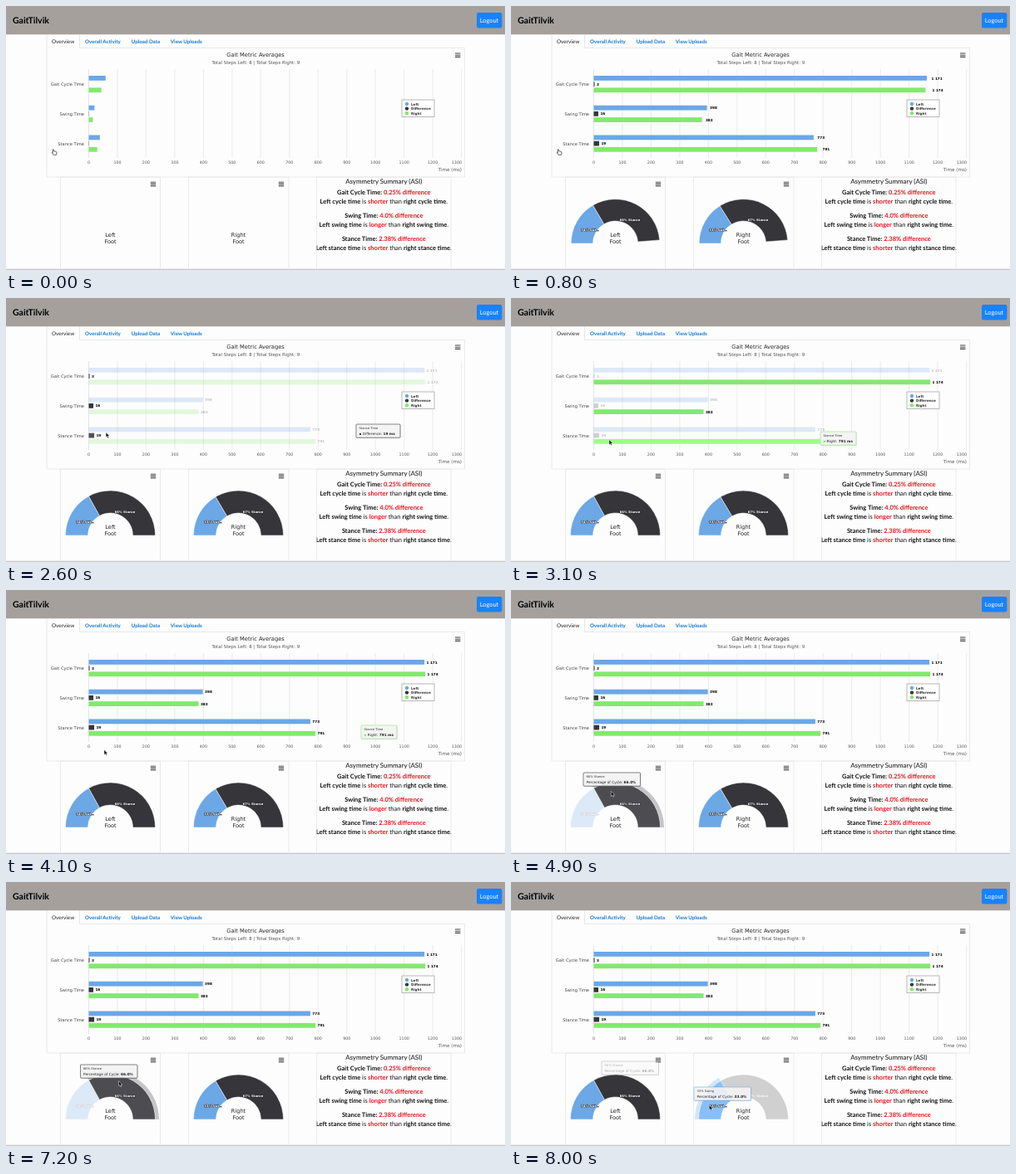
An HTML page for the animation above (8100 ms loop, 600x318 px).

```html
<!DOCTYPE html>
<html lang="en">
<head>
<meta charset="utf-8">
<title>Gait dashboard</title>
<style>
  html, body { margin: 0; width: 100%; height: 100%; overflow: hidden; background: #fdfdfd; }
  svg { display: block; width: 100%; height: 100%; text-rendering: geometricPrecision; }
  text { white-space: pre; }
  .page { font-family: Lato, sans-serif; }
  .chart { font-family: "DejaVu Sans", sans-serif; }
  .mid { text-anchor: middle; }
  .end { text-anchor: end; }
  .bold { font-weight: 700; }
  .warn { font-weight: 700; fill: #e3121b; }
  .slice-label { font-weight: 700; text-anchor: middle; fill: #fff; stroke: #222; stroke-width: .7; paint-order: stroke; }
</style>
</head>
<body>
<svg viewBox="0 0 600 318">
  <g id="static"></g>
  <g id="live"></g>
</svg>
<script>
const LOOP = 8100, STEP = 100;
const AXIS_X = 99.5, PX_PER_MS = 0.3447;
const PIE_Y = 286, INNER = 27, OUTER = 54;
const BLUE = '#6ca7e6', DARK = '#35353a', GREEN = '#84e86e';

const categories = ['Gait Cycle Time', 'Swing Time', 'Stance Time'];
const categoryY = i => 94.1 + 35.75 * i;
const series = [
  { name: 'Left', color: BLUE, bright: '#86bffb', values: [1171, 398, 773], dy: -7.2, lead: .144, tipWidth: 40.5 },
  { name: 'Difference', color: DARK, bright: '#505055', values: [3, 16, 19], dy: 0, lead: .134, tipWidth: 53 },
  { name: 'Right', color: GREEN, bright: '#9dff88', values: [1174, 383, 791], dy: 7.2, lead: .124, tipWidth: 43 }
];
const pies = [
  { name: 'Left', x: 125.5, swing: 34 },
  { name: 'Right', x: 279.5, swing: 33 }
];

// Pointer and tooltip positions as [time, x, y]
const pointerPath = [
  [0, 55.2, 172.3], [1000, 55.2, 172.3], [1300, 104, 166], [1500, 112, 164], [1700, 121, 159.7],
  [2500, 121, 159.7], [2800, 118.5, 166], [3000, 118, 170.7], [4000, 118, 170.7], [4300, 118, 236],
  [4500, 121, 247], [4900, 120.3, 242.5], [7100, 120.3, 242.5], [7200, 135.5, 239.7], [7400, 157, 239],
  [7800, 232, 267], [8000, 238.3, 268.7]
];
const barTipPath = [
  [1300, 161, 157], [1700, 161, 157], [1800, 253, 152], [1900, 345, 152], [2100, 421, 152],
  [2600, 421, 152], [2900, 220, 157], [3100, 372, 161], [3300, 427, 163]
];
const pieTipPath = [
  [4200, 85, 214], [4500, 86, 224], [4900, 87, 220], [7100, 87, 220], [7200, 89.5, 220], [7400, 109, 216]
];
const barHovers = [[1300, 1], [1700, 0], [2600, 1], [2900, 2], [4100, null]];

const clamp = v => Math.max(0, Math.min(1, v));
const ease = v => (1 - Math.cos(Math.PI * clamp(v))) / 2;

function follow(path, t) {
  const next = path.findIndex(p => p[0] > t);
  if (next < 0) return path[path.length - 1].slice(1);
  if (next === 0) return path[0].slice(1);
  const a = path[next - 1], b = path[next], k = (t - a[0]) / (b[0] - a[0]);
  return [a[1] + (b[1] - a[1]) * k, a[2] + (b[2] - a[2]) * k];
}

const text = (x, y, size, str, cls = '', fill = '#111', opacity = 1) =>
  `<text x="${x}" y="${y}" font-size="${size}" class="${cls}" fill="${fill}" opacity="${opacity}">${str}</text>`;
const rect = (x, y, w, h, fill, more = '') =>
  `<rect x="${x}" y="${y}" width="${w}" height="${h}" fill="${fill}" ${more}/>`;
const path = (d, fill, more = '') => `<path d="${d}" fill="${fill}" ${more}/>`;
const line = (d, color, width = .6) => path(d, 'none', `stroke="${color}" stroke-width="${width}"`);
const span = (cls, str) => `<tspan class="${cls}">${str}</tspan>`;
const menu = (x, y) => line(`M${x} ${y}h6.4m-6.4 2.2h6.4m-6.4 2.2h6.4`, '#444', 1.1);

function drawHeader() {
  return rect(0, 0, 600, 34.3, '#a5a09c')
    + text(8, 21, 10.5, 'GaitTilvik', 'bold', '#000')
    + rect(566, 8, 30.4, 18.6, '#1982fb', 'rx="2.2"')
    + text(581, 19.9, 7.4, 'Logout', 'mid', '#fff')
    + line('M49 50.5V34.5M88.5 34.5V50.5H551.5', '#dee2e6', .8)
    + text(55, 45, 6.4, 'Overview', '', '#222')
    + [[95, 'Overall Activity'], [150.7, 'Upload Data'], [197.8, 'View Uploads']]
      .map(([x, label]) => text(x, 45, 6.2, label, 'bold', '#1578d3')).join('');
}

function drawSummary() {
  const rows = [
    ['Gait Cycle', '0.25', 'cycle', 'shorter'],
    ['Swing', '4.0', 'swing', 'longer'],
    ['Stance', '2.38', 'stance', 'shorter']
  ];
  return text(454.3, 213.8, 7.95, 'Asymmetry Summary (ASI)', 'mid')
    + rows.map(([title, percent, kind, verdict], i) => {
      const y = 226.6 + 28 * i;
      return text(454.3, y, 7.5, span('bold', `${title} Time: `) + span('warn', `${percent}% difference`), 'mid')
        + text(454.3, y + 11, 7.5, span('bold', `Left ${kind} time`) + ' is ' + span('warn', verdict)
          + ' than ' + span('bold', `right ${kind} time`) + '.', 'mid');
    }).join('');
}

function drawChartFrame() {
  let out = line('M49 50.5V206H551.5V50.5', '#dedede')
    + text(300, 60.6, 6.67, 'Gait Metric Averages', 'mid', '#222')
    + text(300.3, 69.6, 5.4, 'Total Steps Left: 8 | Total Steps Right: 9', 'mid', '#555')
    + text(548, 199, 5.6, 'Time (ms)', 'end', '#555') + menu(540, 57);
  for (let v = 0; v <= 1300; v += 100) {
    const x = AXIS_X + v * PX_PER_MS;
    out += line(`M${x} 76V183`, v ? '#e0e0e0' : '#ccd6eb')
      + (v < 1300 ? text(x, 189.8, 4.8, v, 'mid', '#555') : text(548, 189.8, 4.8, v, 'end', '#555'));
  }
  categories.forEach((name, i) => out += text(94, categoryY(i) + 1.9, 5.12, name, 'end', '#444'));
  return out;
}

function drawLegend() {
  return rect(476, 113, 39, 20.5, '#fff', 'stroke="#999" stroke-width=".7"')
    + series.map((s, i) => `<circle cx="482" cy="${118 + 5.6 * i}" r="2.2" fill="${s.color}"/>`
      + text(487, 119.5 + 5.6 * i, 4.1, s.name, 'bold', '#333')).join('');
}

function drawPanels() {
  return line('M65.5 318V206H185.5V318M219.5 318V206H340V318M373.5 318V206H535V318', '#dedede')
    + menu(173.8, 212.2) + menu(327.8, 212.2)
    + pies.map(p => text(p.x, 277.7, 6.6, p.name, 'mid', '#222') + text(p.x, 286.4, 6.6, 'Foot', 'mid', '#222')).join('')
    + rect(0, 316, 600, 1, '#ececec') + rect(0, 317, 600, 1, '#c6c6c6');
}

function drawBars(t, hover, labelOpacity) {
  return series.map((s, si) => {
    const dim = hover !== null && hover !== si;
    const grown = ease(t / 1000 + s.lead);
    return `<g opacity="${dim ? .22 : 1}">` + s.values.map((v, i) => {
      const y = categoryY(i) + s.dy, full = v * PX_PER_MS;
      const color = hover === si && i === 2 ? s.bright : s.color;
      const label = String(v).replace(/(\d)(\d{3})$/, '$1 $2');
      return rect(AXIS_X, y - 2.9, full * grown, 5.8, color)
        + text(AXIS_X + full + 2.4, y + 1.6, 4.2, label, 'bold', '#000', labelOpacity);
    }).join('') + '</g>';
  }).join('');
}

function ring(cx, inner, outer, from, to) {
  const at = (r, f) => `${cx - r * Math.cos(Math.PI * f)} ${PIE_Y - r * Math.sin(Math.PI * f)}`;
  return `M${at(outer, from)}A${outer} ${outer} 0 0 1 ${at(outer, to)}L${at(inner, to)}A${inner} ${inner} 0 0 0 ${at(inner, from)}Z`;
}

// active: 'swing', 'stance' or null
function drawPie(pie, t, active, labelOpacity) {
  if (t === 0) return '';
  const grown = ease(t / 1000 + .1), outer = INNER + (OUTER - INNER) * grown, cut = pie.swing / 100;
  const slices = [
    { key: 'swing', from: 0, to: cut, color: BLUE, bright: '#86bffb', label: `${pie.swing}% Swi…`, x: -30.5, y: 270.6 },
    { key: 'stance', from: cut, to: 1, color: DARK, bright: '#4d4d51', label: `${100 - pie.swing}% Stance`, x: 17.5, y: 258.6 }
  ];
  return slices.map(s => {
    const on = active === s.key, dim = active && !on;
    const halo = on ? path(ring(pie.x, OUTER, OUTER + 4.5, s.from, s.to), s.color, 'opacity=".28"') : '';
    return `<g opacity="${dim ? .22 : 1}">` + halo
      + path(ring(pie.x, INNER, outer, s.from * grown, s.to * grown), on ? s.bright : s.color, 'stroke="#fff" stroke-width=".5"')
      + text(pie.x + s.x, s.y, 3.75, s.label, 'slice-label', '#fff', labelOpacity) + '</g>';
  }).join('');
}

function drawTip([x, y], width, color, title, detail, opacity = 1) {
  return `<g opacity="${opacity}">`
    + rect(x + .6, y + .7, width, 16.2, '#000', 'rx="1" opacity=".12"')
    + rect(x, y, width, 16.2, '#f7f7f7', `rx="1" fill-opacity=".9" stroke="${color}" stroke-width=".6"`)
    + text(x + 3.5, y + 6.3, 3.7, title, '', '#333')
    + text(x + 3.5, y + 12.8, 4.25, detail, '', '#222') + '</g>';
}

function drawBarTip(t, hover) {
  if (t < 1300 || t >= 4900) return '';
  const s = series[hover ?? 2];
  const detail = `<tspan fill="${s.color}">▪</tspan> ${s.name}: ` + span('bold', `${s.values[2]} ms`);
  return drawTip(follow(barTipPath, t), s.tipWidth, s.color, 'Stance Time', detail, clamp((4900 - t) / 400));
}

function drawPieTip(position, color, label, percent, opacity) {
  return drawTip(position, 68.5, color, `${percent}% ${label}`, 'Percentage of Cycle: ' + span('bold', `${percent}.0%`), opacity);
}

function drawPointer(t) {
  const [x, y] = follow(pointerPath, t);
  const shape = t < 1300
    ? path('M1 .6Q2 0 2.3 1.2L2.7 2.6 4.7 3Q6 3.4 5.8 4.8L5.2 7H2L.2 4.6Q-.3 3.6 .7 3.7L1.3 4.1Z', '#fff', 'stroke="#222" stroke-width=".7"')
    : path('M0 0V6L1.4 4.8 2.3 6.9 3.4 6.4 2.5 4.4H4.3Z', '#000', 'stroke="#fff" stroke-width=".5"');
  return `<g transform="translate(${x} ${y})">${shape}</g>`;
}

function render(t) {
  const started = barHovers.filter(h => h[0] <= t);
  const hover = started.length ? started[started.length - 1][1] : null;
  const labels = clamp((t - 600) / 200);
  const onLeftPie = t >= 4200 && t < 7500, onRightPie = t >= 7700;
  let out = drawBars(t, hover, labels) + drawLegend()
    + drawPie(pies[0], t, onLeftPie ? 'stance' : null, labels)
    + drawPie(pies[1], t, onRightPie ? 'swing' : null, labels)
    + drawBarTip(t, hover);
  if (t >= 4200) out += drawPieTip(follow(pieTipPath, t), DARK, 'Stance', 66, t < 8000 ? 1 : .35);
  if (onRightPie) out += drawPieTip([220, 247], BLUE, 'Swing', 33, 1);
  document.getElementById('live').innerHTML = `<g class="chart">${out}</g>` + drawPointer(t);
}

document.getElementById('static').innerHTML =
  `<g class="page">${drawHeader()}${drawSummary()}</g><g class="chart">${drawChartFrame()}${drawPanels()}</g>`;

const start = performance.now();
let shown = -1;
function tick() {
  const t = Math.floor((performance.now() - start) / STEP) * STEP % LOOP;
  if (t !== shown) render(shown = t);
  requestAnimationFrame(tick);
}
tick();
</script>
</body>
</html>
```
